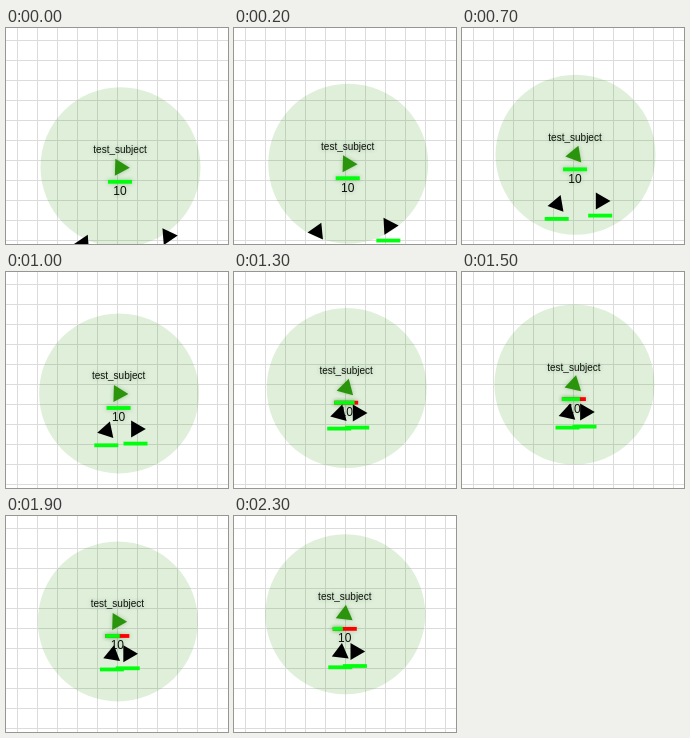
Recreate the animation shown at these times as an HTML page with a canvas. Size 222x216 px, loop 2.4 s.

```html
<!DOCTYPE html>
<html>
<head>
<meta charset="utf-8">
<style>
html, body { margin: 0; width: 100%; height: 100%; overflow: hidden; background: #fff; }
canvas { display: block; }
</style>
</head>
<body>
<canvas id="stage" width="222" height="216"></canvas>
<script>
const ctx = document.getElementById('stage').getContext('2d');
const STEP = 100, STEPS = 24, THIRD = Math.PI * 2 / 3;
const GREEN = '#00ff0c';

// Each point: step, x, y
const leftPath = [[0, 77.5, 215.5], [4, 89, 191.7], [7, 95.2, 176.3], [10, 100.8, 158.7], [13, 105.7, 142], [15, 106, 141], [23, 106.8, 136.7]];
const rightPath = [[0, 162, 208.2], [4, 147.7, 187.7], [7, 138.7, 173], [10, 130, 157], [13, 123.7, 141], [15, 123, 140], [23, 121.4, 135.4]];
const health = [[0, 1], [10, 1], [15, .75], [19, .6], [23, .42]];
const dodgeLeft = new Set([1, 3, 5, 7, 9, 11, 13, 15, 18, 20, 21, 23]);

function along(points, step) {
  let k = 1;
  while (k < points.length - 1 && points[k][0] < step) k++;
  const a = points[k - 1], b = points[k];
  const t = (step - a[0]) / (b[0] - a[0]);
  return a.slice(1).map((v, n) => v + (b[n + 1] - v) * t);
}

function triangle(x, y, angle, color) {
  ctx.fillStyle = color;
  ctx.beginPath();
  for (let k = 0; k < 3; k++) {
    const a = angle + k * THIRD;
    ctx.lineTo(x + 9.8 * Math.cos(a), y + 9.8 * Math.sin(a));
  }
  ctx.fill();
}

function bar(x, y, level) {
  const left = x - 12.5, top = y + 12.7;
  ctx.fillStyle = '#ff0000';
  if (level < 1) ctx.fillRect(left, top, 24, 3.8);
  ctx.fillStyle = GREEN;
  ctx.fillRect(left, top, 24 * level, 3.8);
}

function label(text, x, y, size) {
  ctx.font = size + 'px Arial, "Liberation Sans", sans-serif';
  ctx.fillStyle = '#111';
  ctx.fillText(text, x, y);
}

function grid() {
  ctx.fillStyle = '#dcdcdc';
  for (let x = 11; x < 222; x += 20) ctx.fillRect(x, 0, 1, 216);
  for (let y = 12; y < 216; y += 20) ctx.fillRect(0, y, 222, 1);
}

function draw(step) {
  const px = 114.5 - .14 * step, py = 139.2 - 1.78 * step;
  const [lx, ly] = along(leftPath, step);
  const [rx, ry] = along(rightPath, step);
  const leftAim = Math.atan2(py - ly, px - lx);
  const rightAim = Math.min(Math.atan2(py - ry, px - rx), -THIRD);

  ctx.fillStyle = '#fff';
  ctx.fillRect(0, 0, 222, 216);
  grid();

  ctx.fillStyle = 'rgba(40, 150, 10, .15)';
  ctx.beginPath();
  ctx.arc(px, py, 80, 0, Math.PI * 2);
  ctx.fill();

  ctx.textAlign = 'center';
  ctx.shadowColor = 'rgba(30, 100, 10, .3)';
  ctx.shadowBlur = 4;
  triangle(px - .5, py + .2, dodgeLeft.has(step) ? leftAim : .03, '#2a940c');
  bar(px, py, along(health, step)[0]);
  label('test_subject', px - .5, py - 14, 10);
  label('10', px - .5, py + 28, 12);
  ctx.shadowColor = 'transparent';

  triangle(lx, ly, leftAim, '#000');
  triangle(rx, ry, rightAim, '#000');
  bar(lx, ly, 1);
  bar(rx, ry, 1);
}

const start = performance.now();
function tick() {
  draw(Math.floor((performance.now() - start) / STEP) % STEPS);
  requestAnimationFrame(tick);
}
tick();
</script>
</body>
</html>
```
